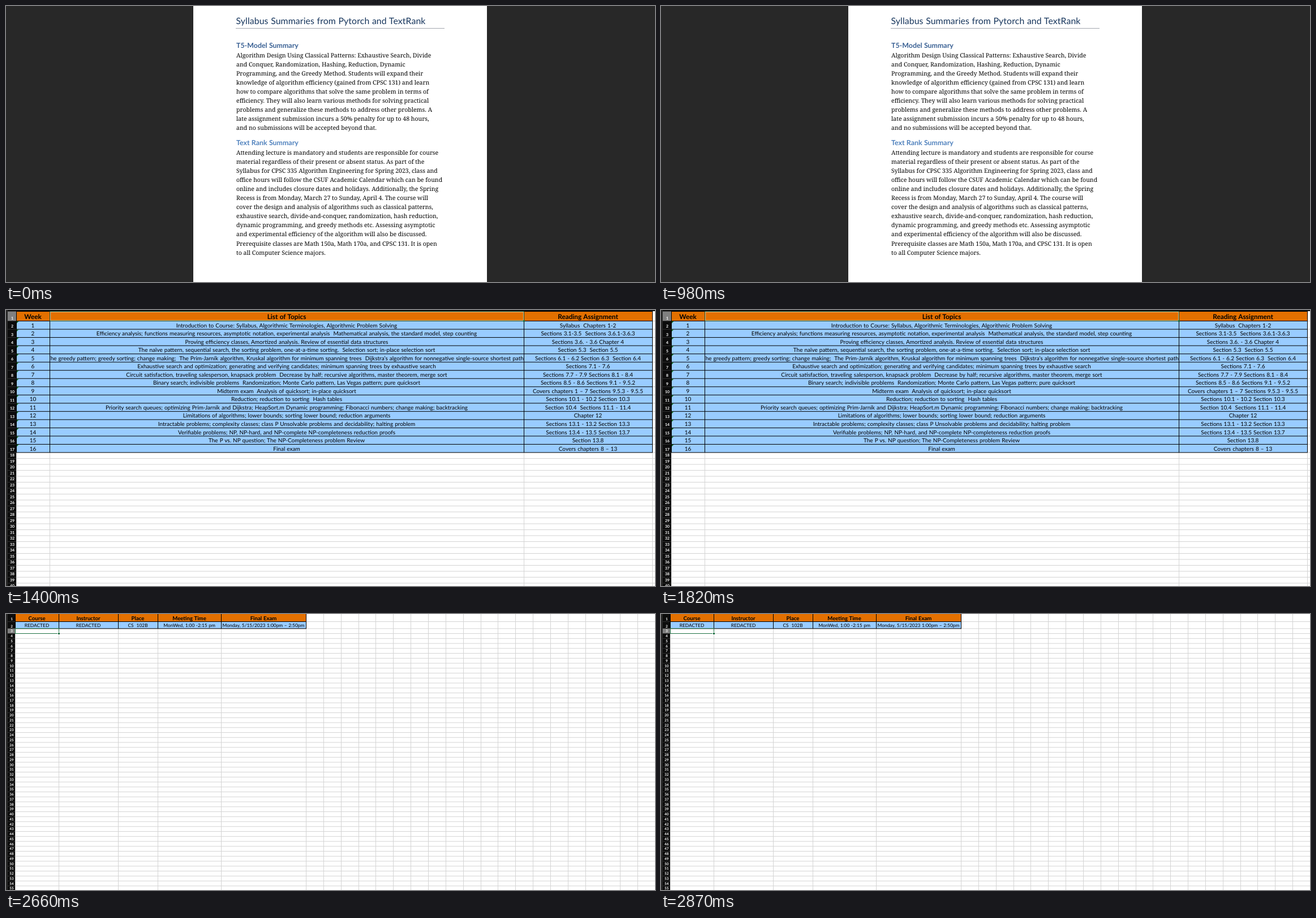
Recreate the animation shown at these times as an HTML page with a canvas. Size 1147 px wide and 488 px high, loop 3.64 s.

```html
<!DOCTYPE html>
<html lang="en">
<head>
<meta charset="utf-8">
<title>Syllabus summaries</title>
<style>
html, body { margin: 0; width: 100%; height: 100%; overflow: hidden; background: #282828; }
canvas { display: block; }
</style>
</head>
<body>
<canvas id="stage" width="1147" height="488"></canvas>
<script>
const W = 1147, H = 488, LOOP = 3640;
const TOPICS_AT = 1050, SELECT_AT = 1120, COURSE_AT = 2660;
const ORANGE = '#e37000', BLUE = '#99ccff', GRID = '#d4d4d4', GREEN = '#217346';
const SANS = 'Lato, sans-serif', SERIF = '"Noto Serif", serif';
const ctx = document.getElementById('stage').getContext('2d');

const summaries = [
  { title: 'T5-Model Summary', color: '#3a6194', titleY: 74, y: 91, lines: [
    'Algorithm Design Using Classical Patterns: Exhaustive Search, Divide',
    'and Conquer, Randomization, Hashing, Reduction, Dynamic',
    'Programming, and the Greedy Method. Students will expand their',
    'knowledge of algorithm efficiency (gained from CPSC 131) and learn',
    'how to compare algorithms that solve the same problem in terms of',
    'efficiency. They will also learn various methods for solving practical',
    'problems and generalize these methods to address other problems. A',
    'late assignment submission incurs a 50% penalty for up to 48 hours,',
    'and no submissions will be accepted beyond that.'
  ] },
  { title: 'Text Rank Summary', color: '#4f81bd', titleY: 246, y: 263, lines: [
    'Attending lecture is mandatory and students are responsible for course',
    'material regardless of their present or absent status. As part of the',
    'Syllabus for CPSC 335 Algorithm Engineering for Spring 2023, class and',
    'office hours will follow the CSUF Academic Calendar which can be found',
    'online and includes closure dates and holidays. Additionally, the Spring',
    'Recess is from Monday, March 27 to Sunday, April 4. The course will',
    'cover the design and analysis of algorithms such as classical patterns,',
    'exhaustive search, divide-and-conquer, randomization, hash reduction,',
    'dynamic programming, and greedy methods etc. Assessing asymptotic',
    'and experimental efficiency of the algorithm will also be discussed.',
    'Prerequisite classes are Math 150a, Math 170a, and CPSC 131. It is open',
    'to all Computer Science majors.'
  ] }
];

const weeks = [
  ['Introduction to Course: Syllabus, Algorithmic Terminologies, Algorithmic Problem Solving', 'Syllabus  Chapters 1-2'],
  ['Efficiency analysis; functions measuring resources, asymptotic notation, experimental analysis  Mathematical analysis, the standard model, step counting', 'Sections 3.1-3.5  Sections 3.6.1-3.6.3'],
  ['Proving efficiency classes, Amortized analysis. Review of essential data structures', 'Sections 3.6. - 3.6 Chapter 4'],
  ['The naïve pattern, sequential search, the sorting problem, one-at-a-time sorting.  Selection sort; in-place selection sort', 'Section 5.3  Section 5.5'],
  ['The greedy pattern; greedy sorting; change making;  The Prim-Jarník algorithm, Kruskal algorithm for minimum spanning trees  Dijkstra’s algorithm for nonnegative single-source shortest paths', 'Sections 6.1 - 6.2 Section 6.3  Section 6.4'],
  ['Exhaustive search and optimization; generating and verifying candidates; minimum spanning trees by exhaustive search', 'Sections 7.1 - 7.6'],
  ['Circuit satisfaction, traveling salesperson, knapsack problem  Decrease by half; recursive algorithms, master theorem, merge sort', 'Sections 7.7 - 7.9 Sections 8.1 - 8.4'],
  ['Binary search; indivisible problems  Randomization; Monte Carlo pattern, Las Vegas pattern; pure quicksort', 'Sections 8.5 - 8.6 Sections 9.1 - 9.5.2'],
  ['Midterm exam  Analysis of quicksort; in-place quicksort', 'Covers chapters 1 – 7 Sections 9.5.3 - 9.5.5'],
  ['Reduction; reduction to sorting  Hash tables', 'Sections 10.1 - 10.2 Section 10.3'],
  ['Priority search queues; optimizing Prim-Jarník and Dijkstra; HeapSort.m Dynamic programming; Fibonacci numbers; change making; backtracking', 'Section 10.4  Sections 11.1 - 11.4'],
  ['Limitations of algorithms; lower bounds; sorting lower bound; reduction arguments', 'Chapter 12'],
  ['Intractable problems; complexity classes; class P Unsolvable problems and decidability; halting problem', 'Sections 13.1 - 13.2 Section 13.3'],
  ['Verifiable problems; NP, NP-hard, and NP-complete NP-completeness reduction proofs', 'Sections 13.4 - 13.5 Section 13.7'],
  ['The P vs. NP question; The NP-Completeness problem Review', 'Section 13.8'],
  ['Final exam', 'Covers chapters 8 – 13']
];

const topicSheet = {
  cols: [18, 77, 915, 1142], gutter: 18, labelX: 11, labelSize: 7, labelDrop: 3,
  top: 2.5, headBottom: 19.5, rowStep: 14.53, emptyStep: 10.5, activeRow: 0,
  headSize: 11.8, bodySize: 10, headLift: 4, bodyLift: 3.4, gap: 0.5,
  rows: [['Week', 'List of Topics', 'Reading Assignment'],
    ...weeks.map((w, i) => [String(i + 1), ...w])],
  extraCols: []
};

const courseSheet = {
  cols: [16, 93, 198, 268, 380, 530], gutter: 16, labelX: 10, labelSize: 6.3, labelDrop: 2.2,
  top: 0, headBottom: 13.5, rowStep: 12.3, emptyStep: 8.75, activeRow: 2,
  headSize: 9.6, bodySize: 8.4, headLift: 2.8, bodyLift: 2.4, gap: 0.4,
  rows: [['Course', 'Instructor', 'Place', 'Meeting Time', 'Final Exam'],
    ['REDACTED', 'REDACTED', 'CS  102B', 'MonWed, 1:00 -2:15 pm', 'Monday, 5/15/2023 1:00pm – 2:50pm']],
  extraCols: Array.from({ length: 19 }, (_, i) => Math.round(530 + 30.85 * (i + 1)))
};

function box(x, y, w, h, color) {
  ctx.fillStyle = color;
  ctx.fillRect(x, y, w, h);
}

// One-pixel row border centred on y; fractional rows stay soft.
function rule(x, y, w, color) {
  box(x, y - 0.5, w, 1, color);
}

function text(str, x, y, font, color, { align = 'left', word = 0, letter = 0 } = {}) {
  ctx.font = font;
  ctx.fillStyle = color;
  ctx.textAlign = align;
  ctx.wordSpacing = word + 'px';
  ctx.letterSpacing = letter + 'px';
  ctx.fillText(str, x, y);
}

function drawDocument() {
  box(0, 0, W, H, '#282828');
  box(331, 0, 519, H, '#fff');
  text('Syllabus Summaries from Pytorch and TextRank', 406.5, 31.8, '15.8px ' + SANS, '#17365d',
    { word: 0.4, letter: 0.12 });
  box(406, 39, 369, 1, '#a3a6ad');
  for (const s of summaries) {
    text(s.title, 407, s.titleY, 'bold 12.4px ' + SANS, s.color, { word: 0.3 });
    s.lines.forEach((line, i) => text(line, 407, s.y + i * 16.05, '10.53px ' + SERIF, '#000'));
  }
}

function drawCells(s, bottoms) {
  const { cols, rows } = s;
  rows.forEach((row, r) => {
    const top = r ? bottoms[r - 1] : s.top;
    const font = r ? `${s.bodySize}px ${SANS}` : `bold ${s.headSize}px ${SANS}`;
    const y = bottoms[r] - (r ? s.bodyLift : s.headLift);
    row.forEach((str, c) => {
      ctx.save();
      ctx.beginPath();
      ctx.rect(cols[c] + 1, top, cols[c + 1] - cols[c] - 1, bottoms[r] - top);
      ctx.clip();
      text(str, (cols[c] + cols[c + 1]) / 2, y, font, '#000', { align: 'center', word: s.gap });
      ctx.restore();
    });
  });
}

function drawGutter(s, bottoms) {
  box(0, 0, s.gutter, H, '#0c0c0c');
  box(0, 0, 3, H, '#282828');
  bottoms.forEach((y, i) => {
    const top = i ? bottoms[i - 1] : s.top;
    if (i === s.activeRow) box(3, top, s.gutter - 3, y - top, '#808080');
    rule(3, y, s.gutter - 3, '#303030');
    text(String(i + 1), s.labelX, y - s.labelDrop, `bold ${s.labelSize}px ${SANS}`, '#fff', { align: 'center' });
  });
}

function drawSheet(s) {
  const { cols, rows } = s;
  const left = cols[0], right = cols[cols.length - 1];
  const bottoms = [];
  for (let i = 0, y = s.headBottom; y < H + 12; i++) {
    bottoms.push(y);
    y += i < rows.length - 1 ? s.rowStep : s.emptyStep;
  }
  const tableEnd = bottoms[rows.length - 1];

  box(0, 0, W, H, '#fff');
  for (const y of bottoms) rule(left, y, W, GRID);
  for (const x of [...cols, ...s.extraCols]) box(x, 0, 1, H, GRID);

  box(left, s.top, right - left, s.headBottom - s.top, ORANGE);
  box(left, s.headBottom, right - left, tableEnd - s.headBottom, BLUE);
  for (let i = 0; i < rows.length; i++) rule(left, bottoms[i], right - left + 1, '#000');
  for (const x of cols) box(x, s.top, 1, tableEnd - s.top, '#000');

  drawCells(s, bottoms);
  drawGutter(s, bottoms);
  return bottoms;
}

function drawTopics(selected) {
  const bottoms = drawSheet(topicSheet);
  box(3, 0, W, 2, '#111');
  box(18, 2, 1125, 1, '#000');
  for (let i = 0; i < weeks.length; i++) {
    const y = bottoms[i] + 0.5;
    ctx.fillStyle = '#146b22';
    ctx.beginPath();
    ctx.moveTo(19, y);
    ctx.lineTo(22.5, y);
    ctx.lineTo(19, y + 3.5);
    ctx.fill();
  }
  if (!selected) return;
  ctx.lineWidth = 1;
  ctx.strokeStyle = '#1e4d2b';
  ctx.strokeRect(77.5, 2.5, 838, 17);
  ctx.strokeStyle = '#d9c08c';
  ctx.strokeRect(78.5, 3.5, 836, 15);
  box(914, 18, 3, 3, GREEN);
}

function drawCourse() {
  drawSheet(courseSheet);
  ctx.lineWidth = 1;
  ctx.strokeStyle = GREEN;
  ctx.strokeRect(16.5, 25.5, 77, 9);
  box(91, 32, 4, 4, '#fff');
  box(92, 33, 3, 3, GREEN);
}

function draw(now) {
  const t = now % LOOP;
  ctx.textRendering = 'geometricPrecision';
  if (t < TOPICS_AT) drawDocument();
  else if (t < COURSE_AT) drawTopics(t >= SELECT_AT);
  else drawCourse();
}

const start = performance.now();
function tick() {
  draw(performance.now() - start);
  requestAnimationFrame(tick);
}
tick();
</script>
</body>
</html>
```
